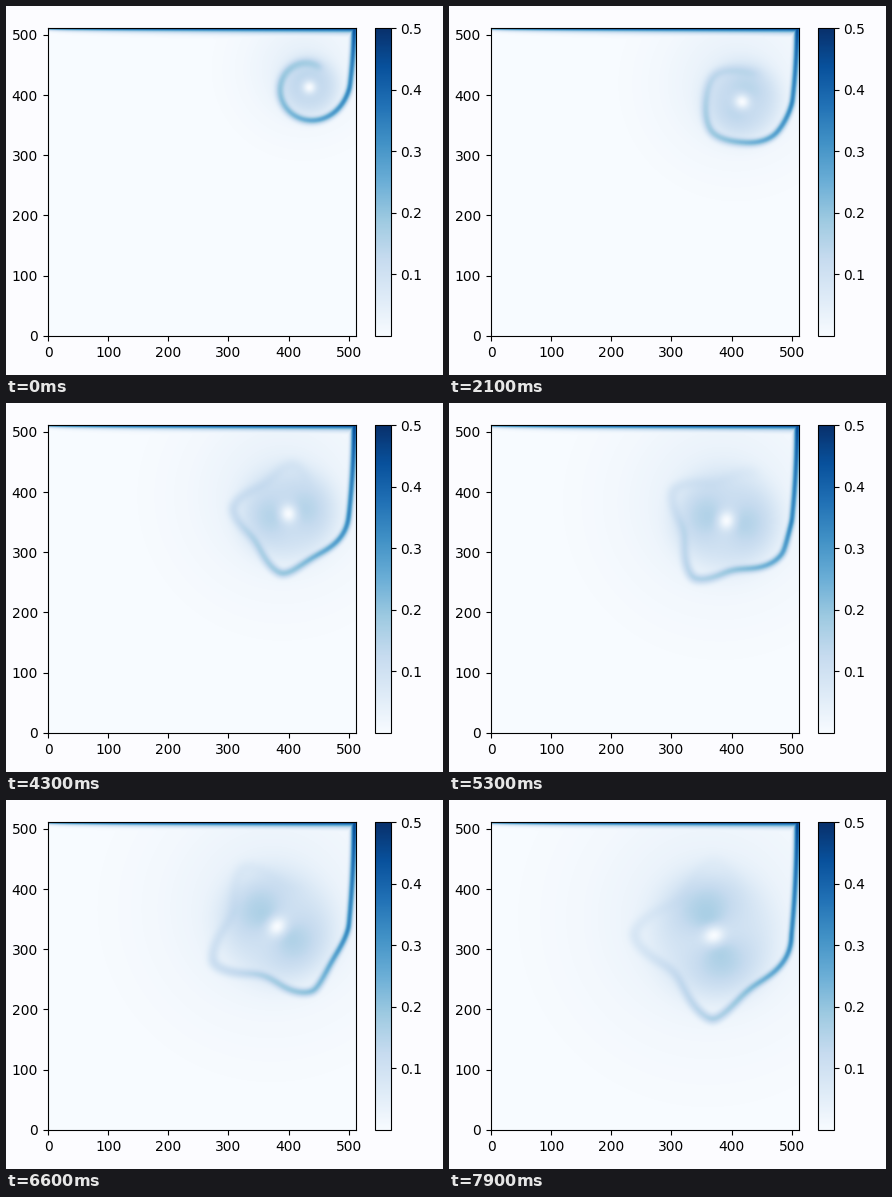
Recreate the animation shown at these times as a matplotlib script. Size 437 px wide and 369 px high, loop 8000 ms.

```python
import numpy as np
import matplotlib.pyplot as plt
from matplotlib.animation import FuncAnimation

W, H, DPI = 437, 369, 100
N, FRAMES, STEP = 512, 80, 100

axis = np.arange(N, dtype=float)
X, Y = np.meshgrid(axis, axis)
# Boundary layer under the moving lid, thicker downstream
lid = 0.5 * np.exp(-((N - Y) / (3 + 5 * np.sqrt(X / N))) ** 1.6)


def bell(center, sigma):
    return np.exp(-0.5 * ((axis[:, None] - center) / sigma) ** 2)


def vortex(u):
    """Centre and radius, drifting away from the corner while growing."""
    return 434 - 64 * u, 413 - 90 * u, 58 + 62 * u


def crest_angle(u):
    """One of four crests that travel clockwise round the vortex."""
    return np.radians(5 - 186 * u)


def wall_jet(u):
    cx, cy, radius = vortex(u)
    q = np.linspace(1, 0, 160)
    foot = cx + radius + 9
    x = 509 - (509 - foot) * (1 - q) ** 2
    y = cy + (535 - cy) * q
    return x, y, 0.33 + 0.17 * q ** 2, np.full_like(q, 4.2)


def rolled_sheet(u):
    """Spiral from the wall round the vortex; s counts half turns."""
    cx, cy, radius = vortex(u)
    s = np.linspace(0, 1.7, 320)
    theta = -np.pi * s
    wave = 1 - 2 * np.abs(np.sin(2 * (theta - crest_angle(u)))) ** 1.3
    swell = 0.2 * (1 - np.exp(-(u / 0.5) ** 2)) * np.minimum(1, 2 * s)
    shrink = 0.16 * (1 - u / 2) * s ** 1.5
    r = radius * (1 - shrink + swell * wave) + 9 * np.exp(-6 * s)
    speed = 0.34 * np.exp(-(0.6 + u) * s)
    sigma = 4.2 + s * (2 + 3 * u)
    return cx + r * np.cos(theta), cy + r * np.sin(theta), speed, sigma


def ridge(u):
    """Gaussian band along the jet and the sheet it turns into."""
    parts = zip(wall_jet(u), rolled_sheet(u))
    x, y, speed, sigma = (np.concatenate(pair) for pair in parts)
    ds = np.hypot(np.gradient(x), np.gradient(y))
    weight = speed * ds / (sigma * np.sqrt(2 * np.pi))
    return (bell(y, sigma) * weight) @ bell(x, sigma).T


def swirl(u):
    """Soft flow inside and around the vortex, still at its core."""
    cx, cy, radius = vortex(u)
    dx, dy = X - cx, Y - cy
    r2 = dx ** 2 + dy ** 2
    lobes = 1 + 0.35 * u * np.cos(
        2 * (np.arctan2(dy, dx) - crest_angle(u) - np.radians(109)))
    disc = 0.095 * lobes * np.exp(-(r2 / (0.85 * radius) ** 2) ** 2)
    halo = 0.045 * np.exp(
        -((dx + 10) ** 2 + (dy - 30) ** 2) / (2 * (1.05 * radius) ** 2))
    return (disc + halo) * (1 - np.exp(-r2 / (11 + 6 * u) ** 2))


def field(frame):
    u = frame / (FRAMES - 1)
    return np.maximum(np.hypot(ridge(u), swirl(u)), lid)


def panel(left, width):
    return fig.add_axes([left / W, 39 / H, width / W, 308 / H])


fig = plt.figure(figsize=(W / DPI, H / DPI), dpi=DPI, facecolor="#fcfcff")
ax = panel(41.7, 308)
img = ax.imshow(field(0), cmap="Blues", vmin=0, vmax=0.5, origin="lower",
                aspect="auto")
ax.set_xticks(range(0, 501, 100))
ax.set_yticks(range(0, 501, 100))
fig.colorbar(img, cax=panel(369.1, 15.4), ticks=np.arange(1, 6) / 10)


def update(frame):
    img.set_data(field(frame))
    return [img]


anim = FuncAnimation(fig, update, frames=FRAMES, interval=STEP, repeat=True)
plt.show()
```
